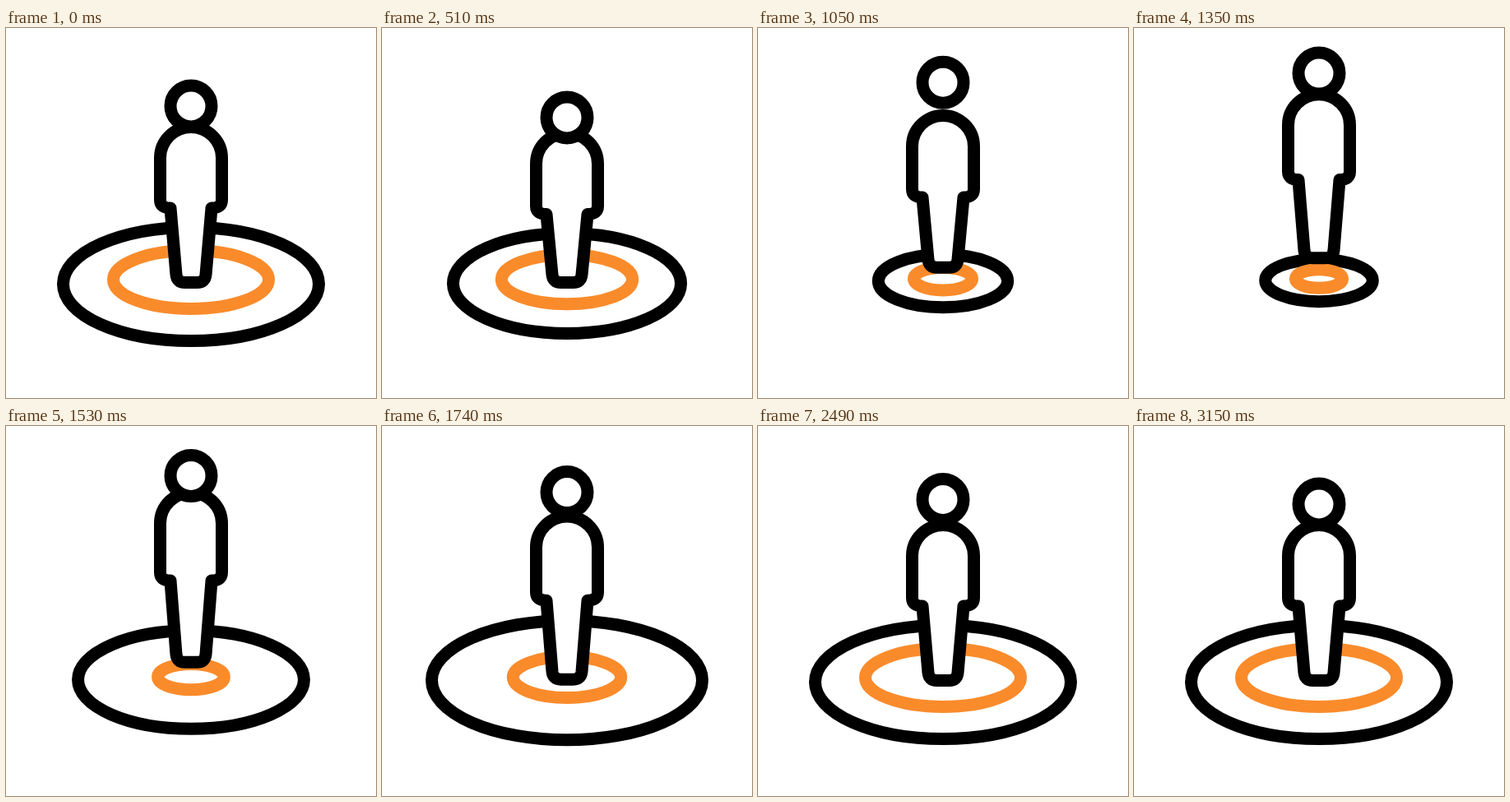
An HTML page for the animation above (4500 ms loop, 450 by 450 pixels).

```html
<!DOCTYPE html>
<html lang="en">
<head>
<meta charset="utf-8">
<title>Jumping figure</title>
<style>
  html, body { margin: 0; width: 100%; height: 100%; overflow: hidden; background: #fff; }
  svg { display: block; width: 100%; height: 100%; }
</style>
</head>
<body>
<svg viewBox="0 0 450 450" fill="#fff" stroke="#000" stroke-width="15" stroke-linejoin="round" stroke-linecap="round">
  <ellipse id="outer" cx="225"/>
  <ellipse id="inner" cx="225" stroke="#fa8b2b"/>
  <path id="body"/>
  <circle id="head" cx="225" r="25"/>
</svg>
<script>
const LOOP = 4500, STEP = 30;
const [outer, inner, body, head] =
  ["outer", "inner", "body", "head"].map(id => document.getElementById(id));

const smooth = u => (1 - Math.cos(Math.PI * u)) / 2;
const lateSmooth = u => smooth(u ** 1.05);
const fall = u => u * u;
const hang = u => u ** 3;
const rise = u => u * (2 - u);

// Each key is [time, value, easing used to reach it].
function track(keys, t) {
  const i = keys.findIndex(key => key[0] > t);
  if (i < 0) return keys.at(-1)[1];
  if (i === 0) return keys[0][1];
  const [t0, v0] = keys[i - 1], [t1, v1, ease = smooth] = keys[i];
  return v0 + (v1 - v0) * ease((t - t0) / (t1 - t0));
}

const headY = [
  [150, 95], [690, 113.5], [1200, 54.5], [1825, 95, hang],
  [2215, 84, rise], [2605, 95, fall], [2880, 89.5, rise], [3150, 95, fall]
];
const shoulderShift = [[150, 0], [690, 9.5], [1450, -42], [1800, 4, fall], [2150, 0]];
const hemShift = [[150, 0], [690, 10], [1400, -35], [1800, 4, fall], [2150, 0]];
const footShift = [[720, 0], [1300, -30], [1750, 0, fall]];

const outerTimes = [150, 1340, 1650, 1955, 2280];
const outerKeys = values =>
  values.map((v, i) => [outerTimes[i], v, i === 1 ? lateSmooth : smooth]);
const outerRx = outerKeys([155.5, 65, 172.5, 132.5, 155.5]);
const outerRy = outerKeys([69, 25.5, 76.4, 57.3, 69]);
const outerCy = outerKeys([311.5, 307, 309.3, 309, 311.5]);
const innerRx = [[150, 94.5], [1300, 28], [2110, 94.5]];

function bodyPath(shoulder, hem, foot) {
  const shoulderY = 158 + shoulder, hemY = 219 + hem;
  const armY = hemY - 10, ankleY = 300 + foot, footY = 309.5 + foot;
  return `M200 ${hemY}Q187.5 ${hemY} 187.5 ${armY}V${shoulderY}` +
    `A37.5 37.5 0 0 1 262.5 ${shoulderY}V${armY}Q262.5 ${hemY} 250 ${hemY}` +
    `L243 ${ankleY}Q242 ${footY} 232.5 ${footY}H217.5Q208 ${footY} 207 ${ankleY}Z`;
}

function setAttributes(element, values) {
  for (const name in values) element.setAttribute(name, values[name]);
}

function draw() {
  const t = Math.floor(performance.now() % LOOP / STEP) * STEP;
  setAttributes(outer, {
    rx: track(outerRx, t), ry: track(outerRy, t), cy: track(outerCy, t)
  });
  const rx = track(innerRx, t);
  setAttributes(inner, {
    rx, ry: 35.5 - 0.367 * (94.5 - rx), cy: 306 - (94.5 - rx) / 65
  });
  setAttributes(body, {
    d: bodyPath(track(shoulderShift, t), track(hemShift, t), track(footShift, t))
  });
  setAttributes(head, { cy: track(headY, t) });
  requestAnimationFrame(draw);
}
draw();
</script>
</body>
</html>
```
